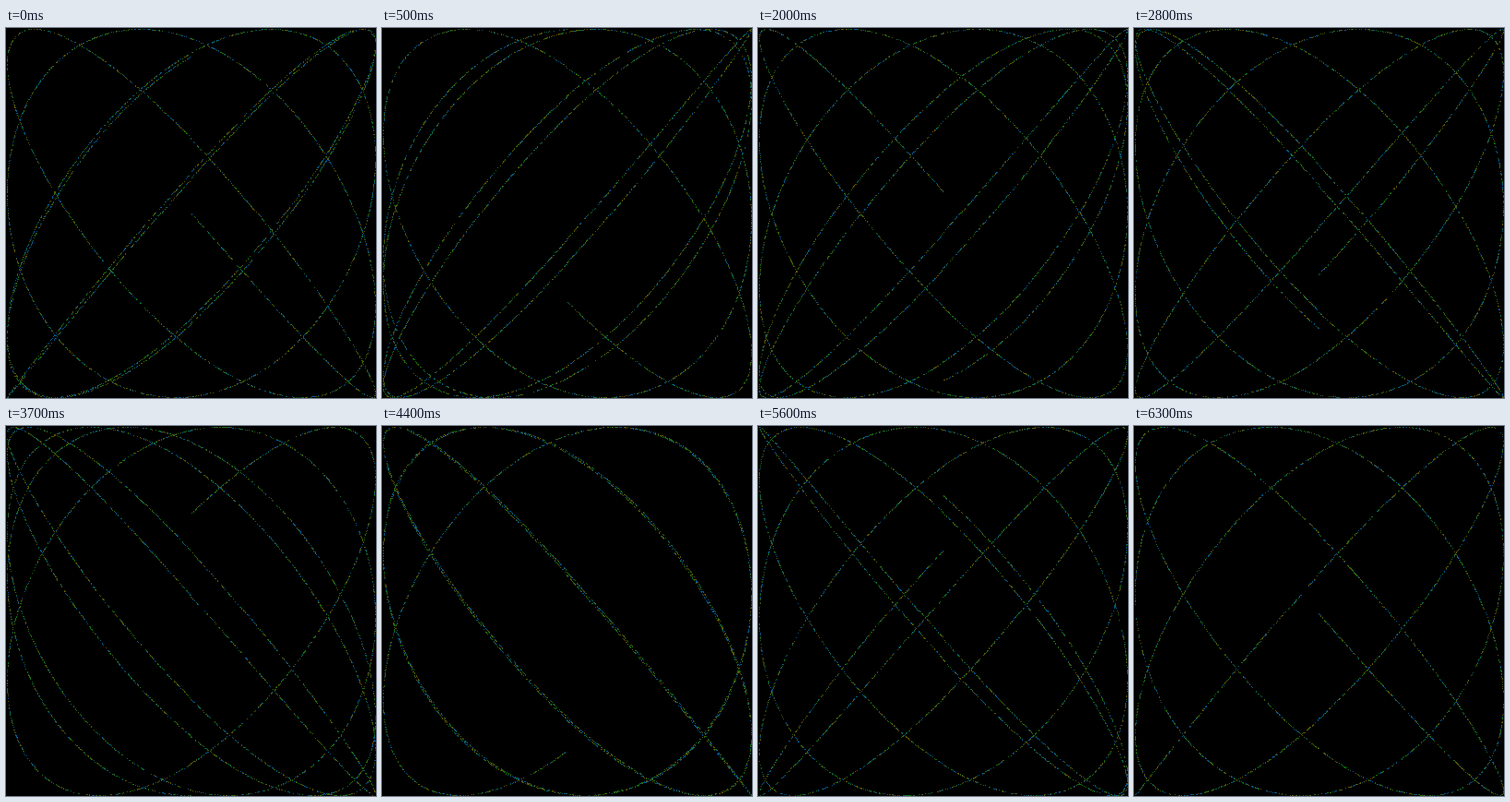
These frames come from a looping animation (401x401 px, 6400 ms). An HTML page with a canvas:

```html
<!DOCTYPE html>
<html lang="en">
<head>
<meta charset="utf-8">
<title>Lissajous</title>
<style>
  html, body { margin: 0; width: 100%; height: 100%; overflow: hidden; background: #000; }
  canvas { display: block; width: 401px; height: 401px; image-rendering: pixelated; }
</style>
</head>
<body>
<canvas id="stage" width="401" height="401"></canvas>
<script>
  const SIZE = 200;
  const SIDE = 2 * SIZE + 1;
  const CYCLES = 5;
  const STEP = 0.001;
  const FREQ = 1.1326;
  const FRAMES = 64;
  const DELAY = 100;
  const PHASE_STEP = 0.1;

  const rgb = (r, g, b) => (255 << 24 | b << 16 | g << 8 | r) >>> 0;
  const BLACK = rgb(0, 0, 0);
  const INKS = [rgb(20, 112, 16), rgb(0, 88, 140), rgb(96, 88, 0)];
  const INK_SHARE = 0.5;

  const ctx = document.getElementById('stage').getContext('2d');
  const image = ctx.createImageData(SIDE, SIDE);
  const pixels = new Uint32Array(image.data.buffer);

  const place = v => SIZE + Math.trunc(v * SIZE + 0.5);

  // Seeded generator, so each frame keeps its own speckle
  function randomizer(seed) {
    let s = Math.imul(seed + 1, 0x9E3779B1);
    return () => {
      s ^= s << 13;
      s ^= s >>> 17;
      s ^= s << 5;
      return (s >>> 0) / 4294967296;
    };
  }

  // Steps without ink paint black, which leaves gaps in the line
  function pickColor(r) {
    return r < INK_SHARE ? INKS[Math.floor(r / INK_SHARE * INKS.length)] : BLACK;
  }

  function draw(frame) {
    const random = randomizer(frame);
    const phase = frame * PHASE_STEP;
    pixels.fill(BLACK);
    for (let t = 0; t < CYCLES * 2 * Math.PI; t += STEP) {
      const x = place(Math.sin(t));
      const y = place(Math.sin(t * FREQ + phase));
      pixels[y * SIDE + x] = pickColor(random());
    }
    ctx.putImageData(image, 0, 0);
  }

  const start = performance.now();
  let shown = -1;

  function tick() {
    const frame = Math.floor((performance.now() - start) / DELAY) % FRAMES;
    if (frame !== shown) draw(shown = frame);
    requestAnimationFrame(tick);
  }
  tick();
</script>
</body>
</html>
```
